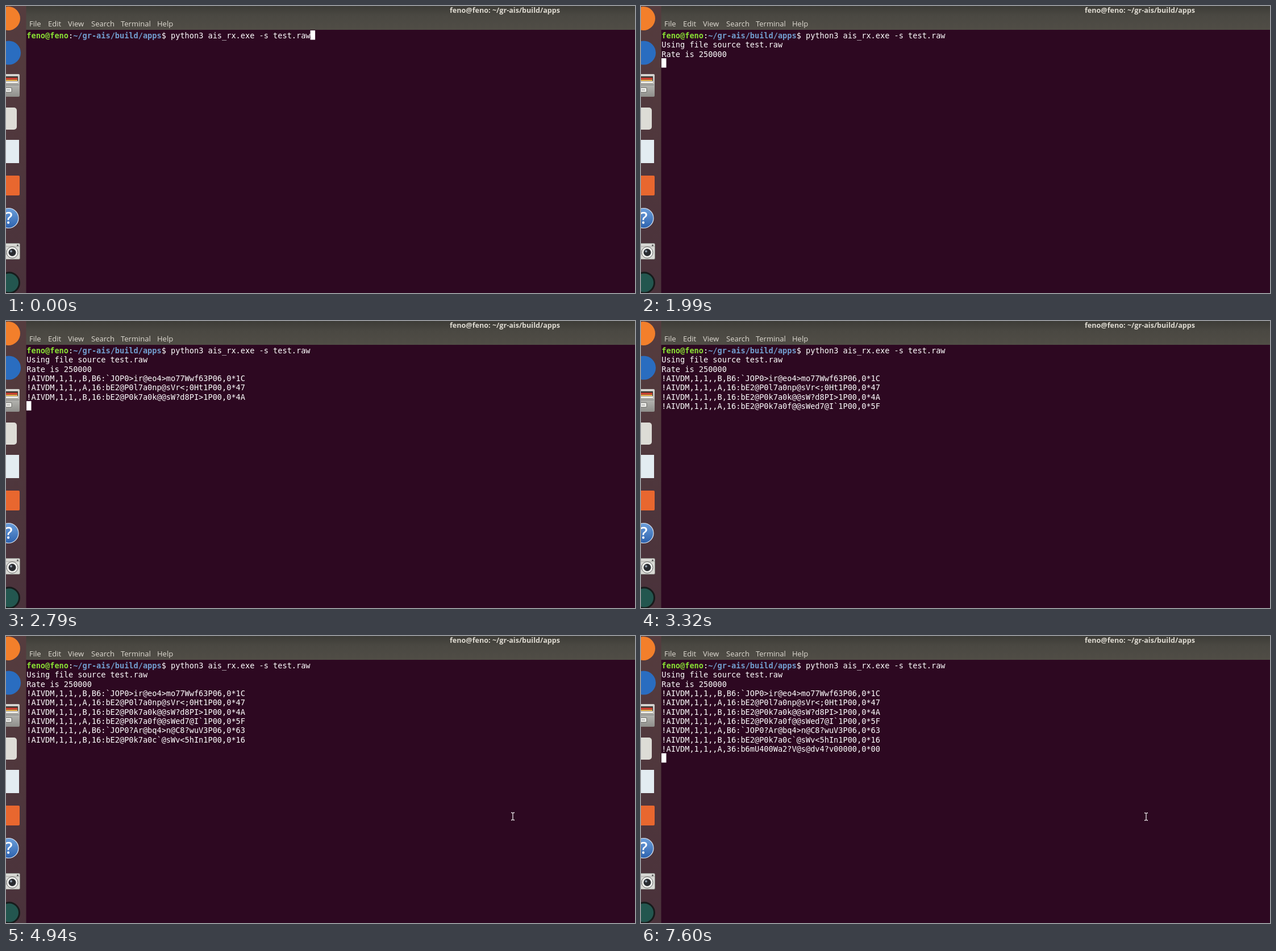
These frames come from a looping animation (1107x506 px, 8000 ms). An HTML page:

```html
<!DOCTYPE html>
<html lang="en">
<head>
<meta charset="utf-8">
<title>Terminal session</title>
<style>
  html, body { margin: 0; width: 100%; height: 100%; overflow: hidden; background: #2d0821; }
  svg { display: block; width: 1107px; height: 506px; }
  .ui { font: 13px "Open Sans", "Noto Sans", sans-serif; fill: #dfdbd2; }
  .title { font-size: 12.6px; font-weight: 700; text-anchor: middle; }
  .term { font: 13.6px "DejaVu Sans Mono", monospace; fill: #fff; white-space: pre; }
  .user { font-weight: bold; fill: #8ae234; }
  .path { font-weight: bold; fill: #729fcf; }
</style>
</head>
<body>
<svg viewBox="0 0 1107 506" xmlns="http://www.w3.org/2000/svg">
  <defs>
    <linearGradient id="bar" x2="0" y2="1">
      <stop offset="0" stop-color="#3d3c37"/>
      <stop offset=".4" stop-color="#4a4842"/>
      <stop offset="1" stop-color="#504d46"/>
    </linearGradient>
    <linearGradient id="dock" x2="0" y2="1">
      <stop offset="0" stop-color="#553c3e"/>
      <stop offset="1" stop-color="#4a323b"/>
    </linearGradient>
    <linearGradient id="metal" x2="0" y2="1">
      <stop offset="0" stop-color="#d6d6d2"/>
      <stop offset="1" stop-color="#8f8f8b"/>
    </linearGradient>
    <linearGradient id="blue" x2="0" y2="1">
      <stop offset="0" stop-color="#6c9fdb"/>
      <stop offset="1" stop-color="#2d62ae"/>
    </linearGradient>
  </defs>

  <rect width="1107" height="506" fill="#2d0821"/>
  <rect x="35" width="1072" height="42" fill="url(#bar)"/>
  <rect width="35.5" height="506" fill="url(#dock)"/>

  <g id="launcher">
    <circle cx="4" cy="22" r="21" fill="#f37f2b"/>
    <circle cx="5" cy="82.500" r="21" fill="#2a6dc0"/>

    <g id="cabinet">
      <rect x="-16" y="120" width="40" height="40" rx="2" fill="url(#metal)"/>
      <rect x="-12" y="124" width="33" height="13" fill="#393633"/>
      <path d="M-12 128H20" stroke="#d8432f" stroke-width="3"/>
      <path d="M-12 131H20" stroke="#f0b54a" stroke-width="2"/>
      <path d="M-12 134.500H21" stroke="#efeee8" stroke-width="4"/>
      <path d="M-15 139H23" stroke="#777"/>
      <rect x="-2" y="144" width="12" height="8" rx="1" fill="#f3f3ef" stroke="#62625e"/>
      <path d="M1 148H7" stroke="#777"/>
    </g>

    <rect x="-20" y="179" width="39" height="39" rx="5" fill="#dddcd6"/>
    <rect x="-18" y="236" width="41" height="41" fill="#e3ecf1"/>
    <rect x="-16" y="299" width="40" height="35" rx="2" fill="#e8672f"/>

    <g id="help">
      <circle cx="4.500" cy="374" r="17.500" fill="url(#blue)" stroke="#dce6f1" stroke-width="1.200"/>
      <text x="5" y="384" text-anchor="middle" fill="#fff" font-family="Open Sans, sans-serif" font-size="28" font-weight="600">?</text>
    </g>

    <g id="camera">
      <rect x="-15" y="418.500" width="39.500" height="28" rx="2" fill="#d9d9d5" stroke="#858581"/>
      <path d="M-14 424H24" stroke="#aaa9a5"/>
      <circle cx="20.500" cy="422" r="1.500" fill="#555"/>
      <circle cx="11" cy="434.500" r="10" fill="#efefec" stroke="#666"/>
      <circle cx="11" cy="434.500" r="6.500" fill="#292b30"/>
      <circle cx="9" cy="432.500" r="2" fill="#8d99a8"/>
    </g>

    <circle cx="5.500" cy="488" r="18" fill="#23564f" stroke="#171b1b" stroke-width="3"/>
  </g>

  <g class="ui">
    <text class="title" x="878" y="11.500">feno@feno: ~/gr-ais/build/apps</text>
    <g id="menu"></g>
  </g>
  <g id="rows" class="term">
    <text x="36.300" y="56.800"><tspan class="user">feno@feno</tspan>:<tspan class="path">~/gr-ais/build/apps</tspan>$ python3 ais_rx.exe -s test.raw</text>
  </g>
  <rect id="caret" width="8.500" height="16.500" fill="#fff"/>
  <path id="pointer" d="M-3-6.500H-1.500L0-5.500 1.500-6.500H3M0-5.500V5.500M-3 6.500H-1.500L0 5.500 1.500 6.500H3" fill="none" stroke="#e8e4e7" stroke-width="1.300"/>
</svg>
<script>
const NS = "http://www.w3.org/2000/svg";
const LOOP = 8000, LEFT = 36.3, TOP = 43, BASE = 56.8, PITCH = 16.37, ADVANCE = 8.19;
const byId = id => document.getElementById(id);

function addText(parent, x, y, content) {
  const node = document.createElementNS(NS, "text");
  node.setAttribute("x", x);
  node.setAttribute("y", y);
  node.textContent = content;
  return parent.appendChild(node);
}

[["File", 41], ["Edit", 74], ["View", 109], ["Search", 150], ["Terminal", 202], ["Help", 266]]
  .forEach(([label, x]) => addText(byId("menu"), x, 36, label));

// Output lines with the time at which each is printed.
const output = [
  [1990, "Using file source test.raw"],
  [1990, "Rate is 250000"],
  [2120, "!AIVDM,1,1,,B,B6:`JOP0>ir@eo4>mo77Wwf63P06,0*1C"],
  [2320, "!AIVDM,1,1,,A,16:bE2@P0l7a0np@sVr<;0Ht1P00,0*47"],
  [2720, "!AIVDM,1,1,,B,16:bE2@P0k7a0k@@sW?d8PI>1P00,0*4A"],
  [3320, "!AIVDM,1,1,,A,16:bE2@P0k7a0f@@sWed7@I`1P00,0*5F"],
  [3580, "!AIVDM,1,1,,A,B6:`JOP0?Ar@bq4>n@C8?wuV3P06,0*63"],
  [3580, "!AIVDM,1,1,,B,16:bE2@P0k7a0c`@sWv<5hIn1P00,0*16"],
  [7470, "!AIVDM,1,1,,A,36:b6mU400Wa2?V@s@dv4?v00000,0*00"]
].map(([at, line], i) => ({
  at, node: addText(byId("rows"), LEFT, BASE + PITCH * (i + 1), line)
}));

// [time, row, column]; a missing row hides the caret.
const caretSteps = [
  [0, 0, 61], [1590, 1], [1990, 3], [2120, 4], [2250], [2790, 6], [3320],
  [3930, 9], [4530], [5140, 9], [5730], [6330, 9], [6940], [7600, 10]
];

// [time, x, y]; a missing position hides the pointer.
const pointerSteps = [
  [0], [180, 1001, 454], [260, 952, 402], [340, 908, 354], [420, 876, 326],
  [500, 861, 314], [590, 868, 318.5], [1460],
  [4730, 871, 316], [4800, 879, 316], [4870, 887, 317], [4940, 892, 318], [5140, 889, 318.5]
];

const stepAt = (steps, t) => steps.findLast(step => step[0] <= t);

function show(node, visible) {
  node.setAttribute("visibility", visible ? "visible" : "hidden");
}

function place(node, visible, x, y) {
  show(node, visible);
  if (visible) node.setAttribute("transform", `translate(${x} ${y})`);
}

function render(t) {
  output.forEach(({ at, node }) => show(node, t >= at));
  const [, row, column = 0] = stepAt(caretSteps, t);
  place(byId("caret"), row !== undefined, 36 + column * ADVANCE, TOP + row * PITCH);
  const [, x, y] = stepAt(pointerSteps, t);
  place(byId("pointer"), x !== undefined, x, y);
}

const start = performance.now();
function tick() {
  render((performance.now() - start) % LOOP);
  requestAnimationFrame(tick);
}
render(0);
requestAnimationFrame(tick);
</script>
</body>
</html>
```
